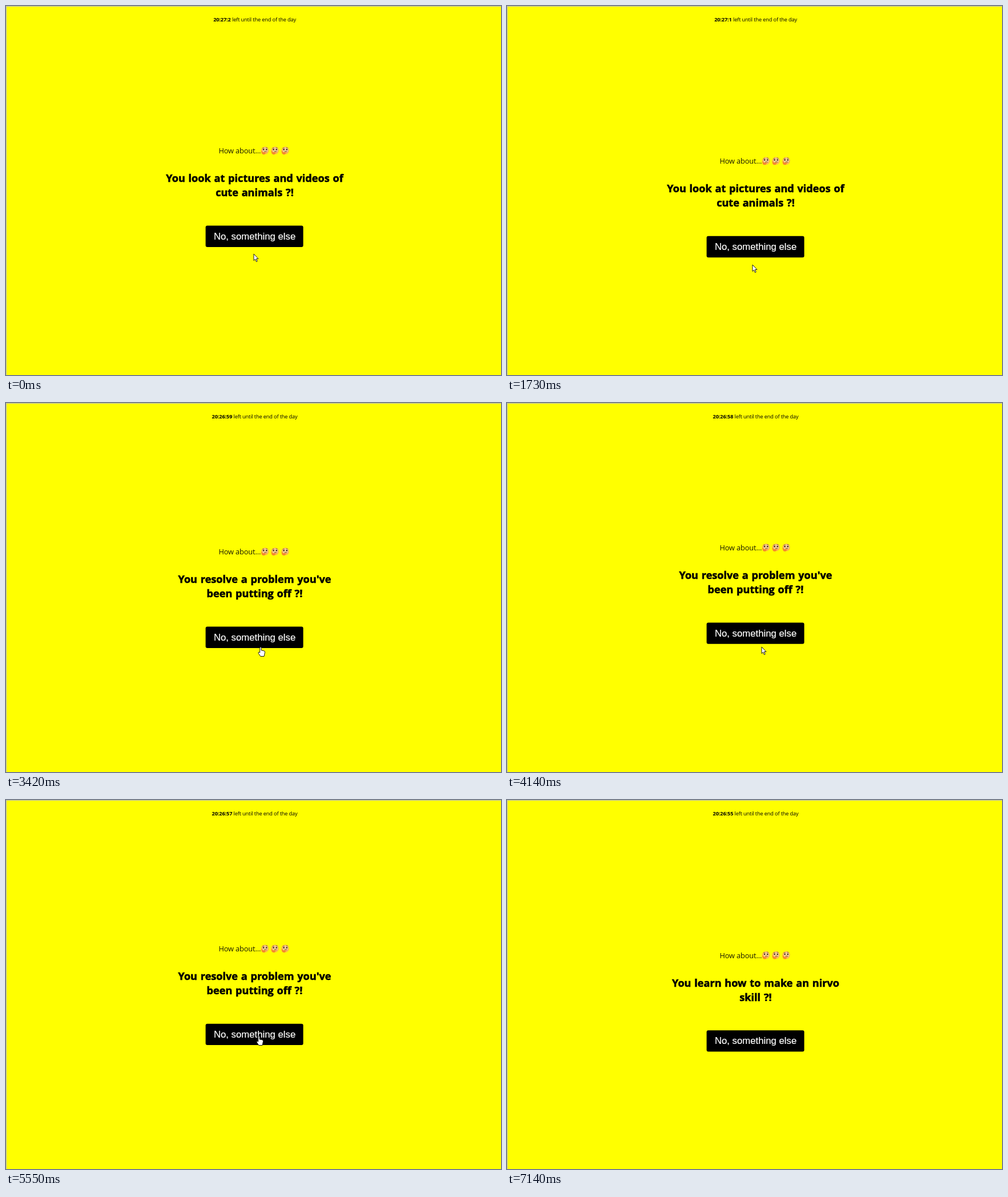
An HTML page for the animation above (7.16 s loop, 867 px wide and 646 px high).

```html
<!DOCTYPE html>
<html lang="en">
<head>
<meta charset="utf-8">
<title>How about...</title>
<style>
  html, body { margin: 0; width: 100%; height: 100%; overflow: hidden; background: #ff0; }
  svg { display: block; }
  text { font-family: "Open Sans", "Noto Sans", sans-serif; text-anchor: middle; white-space: pre; }
  #clock { font-size: 9.2px; letter-spacing: -.13px; }
  #clock tspan { font-weight: 700; }
  #lead { font-size: 12.8px; letter-spacing: -.15px; text-anchor: start; fill: #1a1a00; }
  .idea { font-size: 18.1px; font-weight: 700; word-spacing: 1.1px; stroke: #000; stroke-width: .55px; }
  #label { font: 16.75px "Liberation Sans", Arial, sans-serif; fill: #fff; stroke: #fff; stroke-width: .2px; }
  .cursor { fill: #fff; stroke: #000; stroke-width: .9; stroke-linejoin: round; }
</style>
</head>
<body>
<svg width="867" height="646" viewBox="0 0 867 646">
  <defs>
    <g id="face">
      <circle r="6.7" fill="#fdb94a"/>
      <circle cx=".4" cy="-.8" r="4.8" fill="#f8cf98"/>
      <path d="M-4.4-3.8Q-2.6-5-1-4M1.4-4.8Q3-5.6 4.6-4.2" fill="none" stroke="#7a4a1c" stroke-width=".9"/>
      <circle cx="-2.4" cy="-1.6" r="1.3" fill="#3b2616"/>
      <circle cx="2.8" cy="-1.6" r="1.3" fill="#3b2616"/>
      <path d="M-1.4 2.2Q1 .8 3.2 2.2" fill="none" stroke="#6b3c18" stroke-width=".9"/>
      <path d="M-6.4 1Q-5.4.2-4.6 2L-3.8 3.2 1.6 2.9Q2.8 3.6 1.4 4.3L.4 4.6Q1 7-2.6 7-6.2 6.8-6.4 1Z" fill="#f5882c"/>
    </g>
  </defs>
  <path d="M0 .5H867M.5 0V646" stroke="#bbb"/>
  <text id="clock" x="435.6" y="27"><tspan id="time"></tspan> left until the end of the day</text>
  <g id="card">
    <text id="lead" x="372.5" y="-127">How about...</text>
    <use href="#face" x="453.5" y="-132"/>
    <use href="#face" x="471" y="-132"/>
    <use href="#face" x="489" y="-132"/>
    <text class="idea" x="435.5" y="-77"></text>
    <text class="idea" x="435.5" y="-52"></text>
    <rect x="349.6" y="-.3" width="171" height="37.3" rx="3"/>
    <text id="label" x="435.6" y="23.7">No, something else</text>
  </g>
  <path id="arrow" class="cursor" d="M0 0V11.5L2.6 9.2 4.4 13.6 6.2 12.8 4.4 8.5H8Z"/>
  <path id="hand" class="cursor" d="M-1.3 10V1.4C-1.3-.1 1.2-.1 1.2 1.4V6L5.5 6.8Q7.6 7.2 7.5 9.2L6.8 13 6 16.5H-.2L-3.8 11.2Q-4.6 9.4-3 9Z"/>
</svg>
<script>
const LOOP = 7160;
const FLOAT_HALF = 2415;   // time from the highest to the lowest pose
const POINTER_GONE = 6500;
const $ = id => document.getElementById(id);
const ideaLines = document.querySelectorAll('.idea');

const ideas = [
  { from: 0, lines: ['You look at pictures and videos of', 'cute animals ?!'] },
  { from: 2550, lines: ["You resolve a problem you've", 'been putting off ?!'] },
  { from: 5680, lines: ['You learn how to make an nirvo', 'skill ?!'] }];

const pointerMoves = [
  { from: 0, to: 240, dx: -4, dy: 19 },
  { from: 1840, to: 2000, dx: 16, dy: -26 },
  { from: 4600, to: 4800, dx: -3, dy: -14 },
  { from: 5900, to: 6450, dx: 268, dy: 184 }];

const progress = (t, from, to) => Math.min(1, Math.max(0, (t - from) / (to - from)));

function easeInOut(x) {
  const a = x ** 1.72, b = (1 - x) ** 1.72;
  return a / (a + b);
}

// Top edge of the button while the card floats up and down
function floatTop(t) {
  const phase = (t + 349) / FLOAT_HALF % 2;
  return 384 + 20 * easeInOut(phase < 1 ? phase : 2 - phase);
}

function pointerAt(t) {
  let x = 434, y = 434;
  for (const { from, to, dx, dy } of pointerMoves) {
    const k = progress(t, from, to);
    x += dx * k;
    y += dy * k;
  }
  return [x, y];
}

function clockText(t) {
  const left = 27 * 60 + 2 - Math.floor((t + 55) / 945);
  return `20:${Math.floor(left / 60)}:${left % 60}`;
}

function place(cursor, x, y, visible) {
  cursor.setAttribute('transform', `translate(${x} ${y})`);
  cursor.setAttribute('visibility', visible ? 'visible' : 'hidden');
}

function draw() {
  const t = performance.now() % LOOP;
  const top = floatTop(t);
  const [x, y] = pointerAt(t);
  const present = t < POINTER_GONE;
  const hover = x > 350 && x < 520 && y > top && y < top + 38;
  const { lines } = ideas.findLast(idea => idea.from <= t);

  $('time').textContent = clockText(t);
  $('card').setAttribute('transform', `translate(0 ${top})`);
  ideaLines.forEach((line, i) => line.textContent = lines[i]);
  place($('arrow'), x, y, present && !hover);
  place($('hand'), x, y, present && hover);
  requestAnimationFrame(draw);
}
draw();
</script>
</body>
</html>
```
